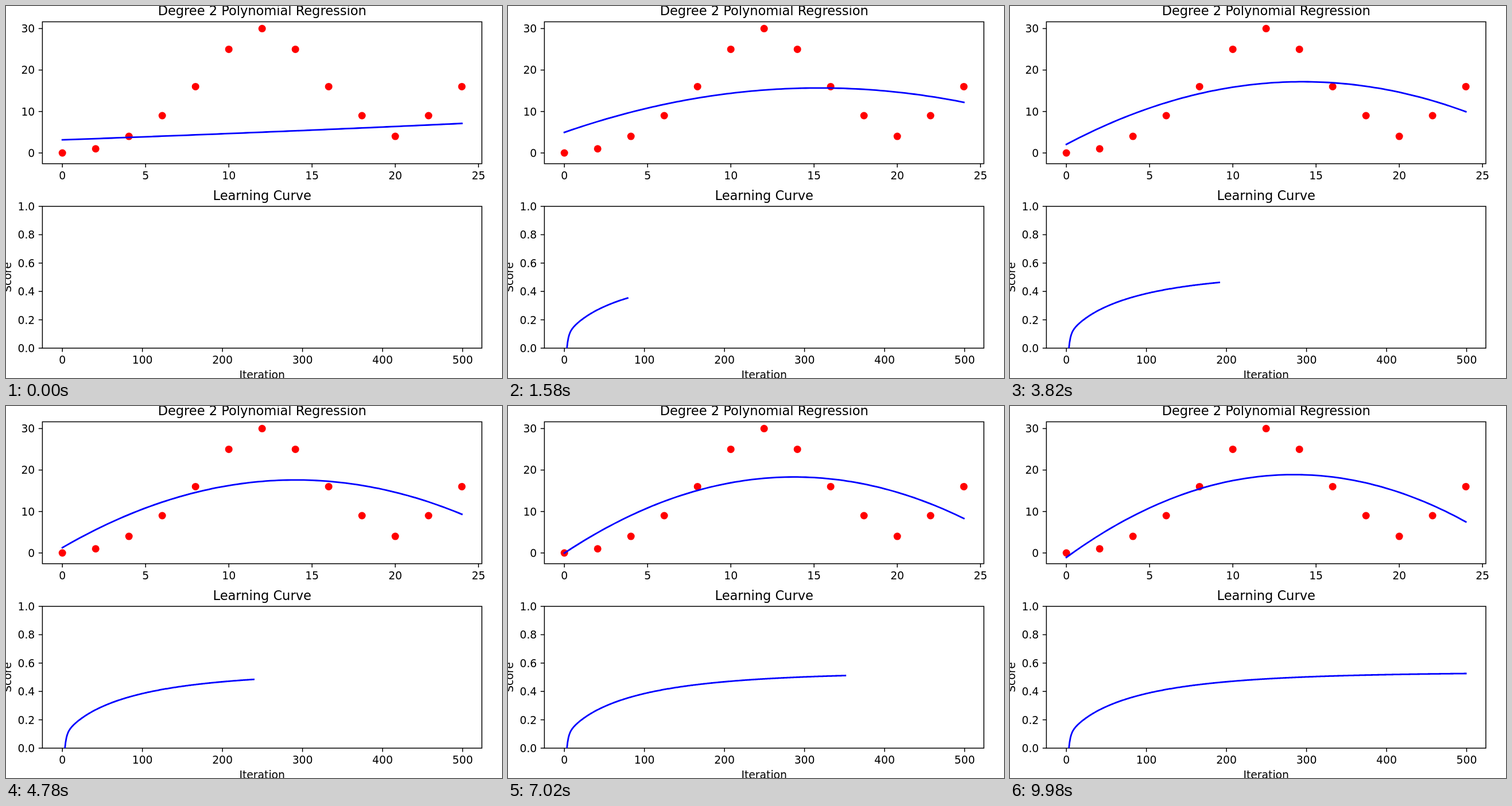
These frames come from a looping animation (864 by 648 pixels, 10000 ms). An HTML page:

```html
<!DOCTYPE html>
<html lang="en">
<head>
<meta charset="utf-8">
<title>Polynomial regression</title>
<style>
  html, body { margin: 0; width: 100%; height: 100%; overflow: hidden; background: #fff; }
  svg { display: block; width: 864px; height: 648px; }
  text { font: 18.75px "DejaVu Sans", sans-serif; text-anchor: middle; }
  text.title { font-size: 22.5px; }
  text.end { text-anchor: end; }
  .axis { fill: none; stroke: #000; stroke-width: 1.5; }
  .line { fill: none; stroke: #00f; stroke-width: 2.8; stroke-linecap: square; stroke-linejoin: round; }
</style>
</head>
<body>
<svg viewBox="0 0 864 648">
  <defs><clipPath id="clip"><rect x="63.4" y="349" width="765.5" height="247"/></clipPath></defs>
</svg>
<script>
const svg = document.querySelector('svg');
const LEFT = 63.4, WIDTH = 765.5, X0 = 98.2, MID = 446.2;

function add(tag, attrs, content = '') {
  const el = document.createElementNS('http://www.w3.org/2000/svg', tag);
  for (const k in attrs) el.setAttribute(k, attrs[k]);
  el.textContent = content;
  return svg.appendChild(el);
}

const fitX = x => X0 + x * 28.995;
const fitY = y => 256 - y * 7.222;
const curveX = i => X0 + i * 1.3945;
const curveY = s => 596 - s * 247;

function axes(top, height, title, xTicks, xMap, yTicks, yMap, digits) {
  const bottom = top + height;
  add('rect', { class: 'axis', x: LEFT, y: top, width: WIDTH, height });
  add('text', { class: 'title', x: MID, y: top - 11.3 }, title);
  for (const v of xTicks) {
    add('path', { class: 'axis', d: `M${xMap(v)} ${bottom}v6.6` });
    add('text', { x: xMap(v), y: bottom + 27.4 }, v);
  }
  for (const v of yTicks) {
    add('path', { class: 'axis', d: `M${LEFT} ${yMap(v)}h-6.6` });
    add('text', { class: 'end', x: 50.3, y: yMap(v) + 6.9 }, v.toFixed(digits));
  }
}

// Data and its standardised features x and x².
const ys = [0, 1, 4, 9, 16, 25, 30, 25, 16, 9, 4, 9, 16];
const xs = ys.map((_, i) => 2 * i);
const mean = a => a.reduce((s, v) => s + v, 0) / a.length;
const cov = (a, b) => mean(a.map((v, i) => v * b[i])) - mean(a) * mean(b);
function scaler(a) {
  const m = mean(a), sd = Math.sqrt(cov(a, a));
  return v => (v - m) / sd;
}
const z1 = scaler(xs), sq = scaler(xs.map(x => x * x)), z2 = x => sq(x * x);
const f1 = xs.map(z1), f2 = xs.map(z2);
const r = cov(f1, f2), c1 = cov(f1, ys), c2 = cov(f2, ys);
const yMean = mean(ys), yVar = cov(ys, ys);

// Descent with a step of eta / t^0.25, solved along the two eigenvectors.
const EPOCHS = 500, models = [];
let tau = 0.03, step = 0;
for (let n = 0; n < EPOCHS; n++) {
  for (let k = 0; k < ys.length; k++) tau += 0.0563 / Math.pow(++step, 0.25);
  const grow = lambda => (1 - Math.exp(-lambda * tau)) / lambda;
  const fast = (c1 + c2) / 2 * grow(1 + r);
  const slow = (c1 - c2) / 2 * grow(1 - r);
  const bias = yMean * grow(1), w1 = fast + slow, w2 = fast - slow;
  const predict = x => bias + w1 * z1(x) + w2 * z2(x);
  const score = 1 - mean(xs.map((x, i) => (ys[i] - predict(x)) ** 2)) / yVar;
  models.push({ predict, score });
}

axes(27.5, 247.2, 'Degree 2 Polynomial Regression',
  [0, 5, 10, 15, 20, 25], fitX, [0, 10, 20, 30], fitY, 0);
axes(349, 247, 'Learning Curve',
  [0, 100, 200, 300, 400, 500], curveX, [0, 0.2, 0.4, 0.6, 0.8, 1], curveY, 1);
add('text', { x: MID, y: 649.3 }, 'Iteration');
add('text', { transform: 'translate(9.2 472.6) rotate(-90)' }, 'Score');
ys.forEach((y, i) => add('circle', { cx: fitX(xs[i]), cy: fitY(y), r: 6.5, fill: '#f00' }));

const fit = add('path', { class: 'line' });
const curve = add('path', { class: 'line', 'clip-path': 'url(#clip)' });
const pathOf = pts => 'M' + pts.map(p => p.map(v => v.toFixed(2)).join(' ')).join('L');
const grid = Array.from({ length: 97 }, (_, i) => i / 4);
const scores = models.map((m, i) => [curveX(i), curveY(m.score)]);

let shown = -1;
function draw() {
  const n = Math.floor(performance.now() % 10000 / 20);
  if (n !== shown) {
    shown = n;
    fit.setAttribute('d', pathOf(grid.map(x => [fitX(x), fitY(models[n].predict(x))])));
    curve.setAttribute('d', pathOf(scores.slice(0, n + 1)));
  }
  requestAnimationFrame(draw);
}
draw();
</script>
</body>
</html>
```
